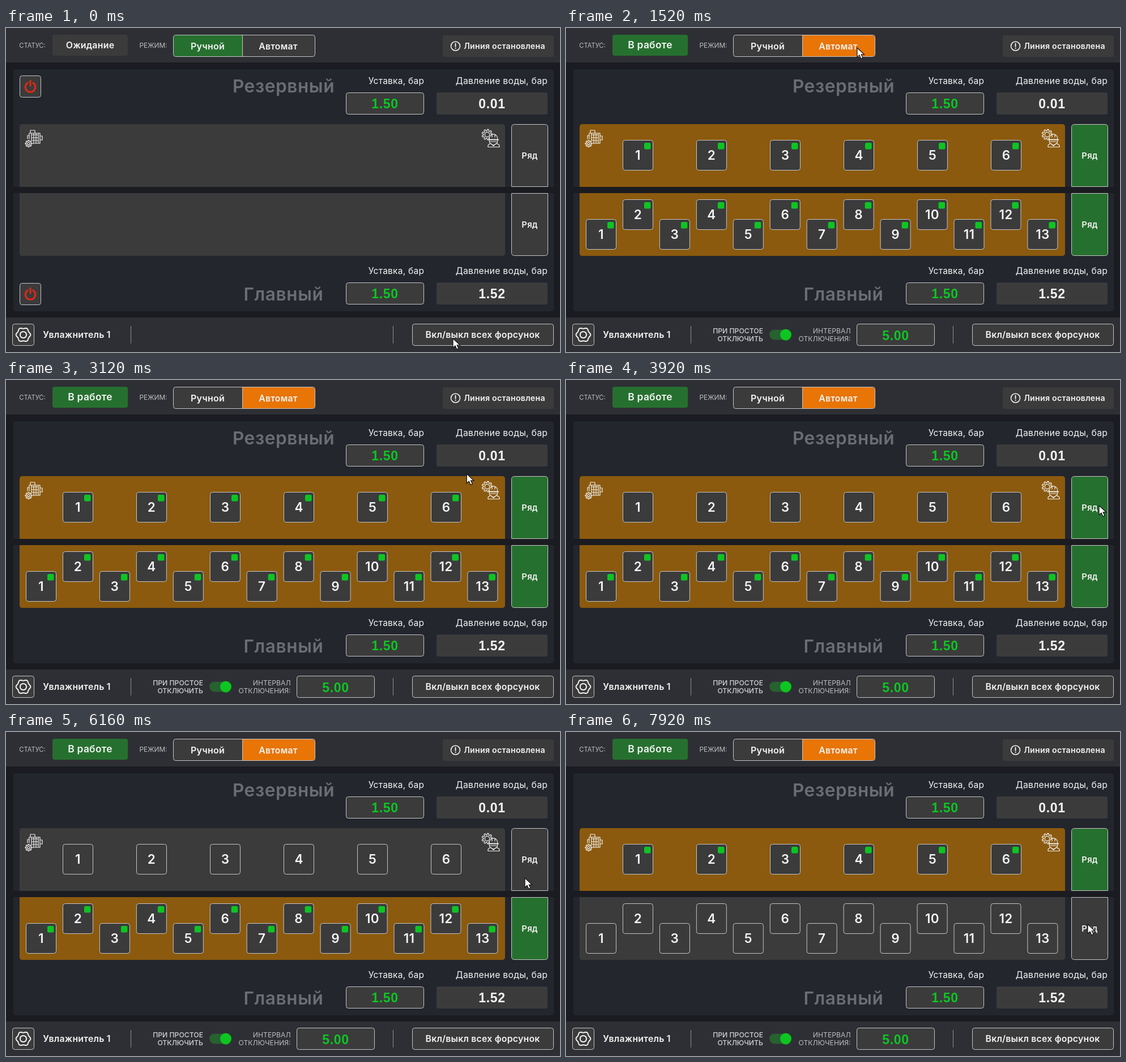
An HTML page for the animation above (8000 ms loop, 978 px wide and 573 px high).

```html
<!DOCTYPE html>
<html lang="ru">
<head>
<meta charset="utf-8">
<style>
  html, body { margin: 0; width: 100%; height: 100%; overflow: hidden; background: #1b1c21; }
  svg { display: block; width: 100vw; height: 100vh; }
  text { font-family: Inter, "Noto Sans", sans-serif; font-weight: 600; fill: #f4f4f4; text-anchor: middle; letter-spacing: .25px; }
  .thin { font-weight: 400; }
  .num { font-family: "Liberation Sans", Arial, sans-serif; font-weight: 700; letter-spacing: .7px; }
  .title { fill: #6c6d71; letter-spacing: .6px; }
  .caption { font-weight: 400; fill: #bcbdbf; letter-spacing: 0; }
  .end { text-anchor: end; }
  .strong { font-weight: 500; fill: #d2d3d5; }
  .line { fill: none; stroke: #f0f0f0; stroke-width: 1.2; stroke-linejoin: round; stroke-linecap: round; }
  #worker .line { fill: inherit; }
</style>
</head>
<body>
<svg id="stage" viewBox="0 0 978 573" preserveAspectRatio="none"></svg>
<script>
const GREEN = '#26702f', LIME = '#0dc522', GREY = '#3b3b3c', ORANGE = '#e87506', AMBER = '#8b5a0e', BAR = '#2e2f34';

const rect = (x, y, w, h, fill, r = 4, attr = '') =>
  `<rect x="${x}" y="${y}" width="${w}" height="${h}" rx="${r}" fill="${fill}" ${attr}/>`;
const framed = (x, y, w, h, fill = GREY) =>
  rect(x + .5, y + .5, w - 1, h - 1, fill, 4, 'stroke="#c6c6c6"');
const text = (x, y, size, str, attr = '') =>
  `<text x="${x}" y="${y}" font-size="${size}" ${attr}>${str}</text>`;
const path = (d, attr = 'class="line"') => `<path d="${d}" ${attr}/>`;
const circle = (x, y, r, attr = 'class="line"') => `<circle cx="${x}" cy="${y}" r="${r}" ${attr}/>`;

// Box whose corners are rounded only at the top or only at the bottom
function half(x, y, w, h, top, attr) {
  const r = 5, a = top ? r : 0, b = r - a;
  return path(`M${x} ${y + a}q0 ${-a} ${a} ${-a}h${w - 2 * a}q${a} 0 ${a} ${a}v${h - r}` +
    `q0 ${b} ${-b} ${b}h${2 * b - w}q${-b} 0 ${-b} ${-b}z`, attr);
}

function gear(x, y, r, depth, teeth, sharp, attr) {
  const pts = [];
  for (let i = 0; i < 144; i++) {
    const a = i / 72 * Math.PI;
    const k = r + depth * Math.max(-1, Math.min(1, sharp * Math.cos(teeth * a)));
    pts.push((x + k * Math.cos(a)).toFixed(2) + ' ' + (y + k * Math.sin(a)).toFixed(2));
  }
  return path('M' + pts.join('L') + 'z', attr);
}

const power = y => framed(24, y, 38, 39) +
  path(`M38.2 ${y + 13}a8.8 8.8 0 1 0 9.6 0M43 ${y + 9}v9`,
    'fill="none" stroke="#df2a14" stroke-width="3" stroke-linecap="round"');

const readings = (y, pressure) =>
  text(689, y, 15.5, 'Уставка, бар', 'class="thin"') +
  text(875, y, 15.8, 'Давление воды, бар', 'class="thin"') +
  framed(600, y + 15, 138, 39) + rect(760, y + 15, 196, 39, GREY, 3) +
  text(669, y + 43, 23, '1.50', `class="num" style="fill:${LIME}"`) +
  text(858, y + 43, 23, pressure, 'class="num"');

const title = (y, str) => text(490, y, 31.6, str, 'class="title"');

const row = (id, y, top) =>
  half(24, y, 857, 111, top, `id="${id}Band"`) +
  half(892.5, y + .5, 64, 110, top, `id="${id}Btn" stroke="#c6c6c6"`) +
  text(924.5, y + 61, 14.8, 'Ряд');

function tiles(id, count, place) {
  let boxes = '', dots = '';
  for (let i = 0; i < count; i++) {
    const [x, y] = place(i);
    boxes += framed(x - 27, y - 27, 54, 54) + text(x, y + 8, 22.5, i + 1);
    dots += rect(x + 11, y - 22, 11.5, 11.5, LIME, 2.5);
  }
  return `<g class="auto">${boxes}<g id="${id}Dots">${dots}</g></g>`;
}

const motor =
  path('M43 185v-4h8v4M41 186h19v18h-13M41 186v10M45 186v12M49 186v18M53 186v18M57 186v18' +
    'M41 190h-3v6M60 191h4v7h-4M45 189h12M45 194h12M45 199h12') +
  gear(40, 204.5, 5, 1, 8, 3, 'class="line"') + circle(40, 204.5, 2);

// The helmet is filled with the band colour so that it covers the gear
const engineer = '<g id="worker">' +
  gear(849.5, 188.5, 8, 1.3, 9, 3, 'class="line"') + circle(849.5, 188.5, 4.2) +
  path('M853 198q0 8 7.500 9q7.500-1 7.500-9z') +
  path('M851 197.500h19M853 197q0-8 7.500-9.500q7.500 1.500 7.500 9.500zM858 193v-5h5v5M855 201h11' +
    'M851 210.500v-3q2-3 5-3l4.500 4 4.500-4q4 0 6 3v3z') + '</g>';

stage.innerHTML =
  rect(0, 0, 978, 573, '#1b1c21', 0) +
  rect(0, 0, 978, 61, BAR, 0) + rect(0, 512, 978, 61, BAR, 0) +
  half(13, 73, 954, 208, true, 'fill="#23262d"') + half(13, 292, 954, 209, false, 'fill="#23262d"') +

  text(46.5, 35, 11.2, 'СТАТУС:', 'class="caption"') + text(260, 35, 11.8, 'РЕЖИМ:', 'class="caption"') +
  rect(82, 12, 133, 37, GREY, 4, 'id="status"') + text(148.5, 36, 16, '', 'id="statusText"') +
  path('M417 13h-117q-4 0-4 4v29q0 4 4 4h117z', 'id="manual"') +
  path('M417 13h124q4 0 4 4v29q0 4-4 4h-124z', 'id="automatic"') +
  framed(295, 12, 251, 39, 'none') + path('M417.500 13v37', 'stroke="#c6c6c6"') +
  text(356, 37.5, 16, 'Ручной') + text(480.5, 37.5, 15.7, 'Автомат') +
  rect(771, 13, 196, 38, GREY, 3) +
  circle(793.5, 32, 8, 'fill="none" stroke="#f4f4f4" stroke-width="1.6"') +
  path('M793.500 27.500v5.500M793.500 35.700v.3', 'stroke="#f4f4f4" stroke-width="1.8" stroke-linecap="round"') +
  text(880, 37, 14.2, 'Линия остановлена') +

  title(114, 'Резервный') + title(481.5, 'Главный') +
  readings(99, '0.01') + readings(435, '1.52') +
  `<g id="powers">${power(84)}${power(451)}</g>` +
  row('top', 170, true) + row('low', 292, false) + motor + engineer +
  tiles('top', 6, i => [127 + 130 * i, 225]) +
  tiles('low', 13, i => [62 + 64.95 * i, i % 2 ? 330 : 365]) +

  framed(11, 523, 39, 39) +
  gear(30.5, 542.5, 11.8, 1, 6, 1, 'fill="none" stroke="#f4f4f4" stroke-width="2"') +
  circle(30.5, 542.5, 5.6, 'fill="none" stroke="#f4f4f4" stroke-width="2"') +
  text(125, 548, 15.8, 'Увлажнитель 1') +
  path('M220.500 527v31M683.500 527v31', 'stroke="#8e8f92"') +
  framed(717, 523, 250, 39) + text(841.5, 548, 15.8, 'Вкл/выкл всех форсунок') +
  '<g class="auto">' +
  text(348, 540, 12.2, 'ПРИ ПРОСТОЕ', 'class="caption end strong"') +
  text(348, 554, 12.2, 'ОТКЛЮЧИТЬ', 'class="caption end strong"') +
  rect(359, 533.5, 37, 18, '#27612f', 9) + circle(388, 542.5, 10, `fill="${LIME}"`) +
  text(502.5, 540, 12.2, 'ИНТЕРВАЛ', 'class="caption end"') +
  text(502.5, 554, 12.2, 'ОТКЛЮЧЕНИЯ:', 'class="caption end"') +
  framed(513, 523, 138, 39) + text(582, 552, 23, '5.00', `class="num" style="fill:${LIME}"`) +
  '</g>' +
  path('M0 0V16.500L4 13l2.900 6.300 3.100-1.400L7.200 11.800h5.300z',
    'id="cursor" fill="#fff" stroke="#111" stroke-width="1.2"');

const el = id => document.getElementById(id);
const fill = (id, color) => el(id).setAttribute('fill', color);
const show = (node, on) => node.style.display = on ? '' : 'none';

// Cursor stops: time, x, y
const stops = [
  [0, 789, 549], [160, 789, 549], [900, 514, 35], [2560, 514, 35], [3440, 941, 222],
  [4480, 941, 222], [5040, 916, 239], [6000, 916, 239], [6600, 916, 348],
  [6880, 916, 348], [7200, 921, 340], [8000, 921, 340]
];

function cursorAt(t) {
  const i = stops.findIndex(s => s[0] > t);
  const [t0, x0, y0] = stops[i - 1], [t1, x1, y1] = stops[i];
  const u = (t - t0) / (t1 - t0), k = u * u * (3 - 2 * u);
  return [x0 + (x1 - x0) * k, y0 + (y1 - y0) * k];
}

function setRow(id, on, dots) {
  fill(id + 'Band', on ? AMBER : GREY);
  fill(id + 'Btn', on ? GREEN : GREY);
  show(el(id + 'Dots'), dots);
}

function draw(now) {
  const t = now % 8000, auto = t >= 1280, running = t >= 1440;
  const topOn = running && t < 4320 || t >= 6320;
  fill('manual', auto ? GREY : GREEN);
  fill('automatic', auto ? ORANGE : GREY);
  fill('status', running ? GREEN : GREY);
  el('statusText').textContent = running ? 'В работе' : 'Ожидание';
  el('statusText').setAttribute('font-size', running ? 17.4 : 15.9);
  show(el('powers'), !auto);
  document.querySelectorAll('.auto').forEach(g => show(g, auto));
  setRow('top', topOn, running && t < 3760 || t >= 6480);
  setRow('low', running && t < 7600, running && t < 7280);
  fill('worker', topOn ? AMBER : GREY);
  el('cursor').setAttribute('transform', `translate(${cursorAt(t)})`);
  requestAnimationFrame(draw);
}
requestAnimationFrame(draw);
</script>
</body>
</html>
```
